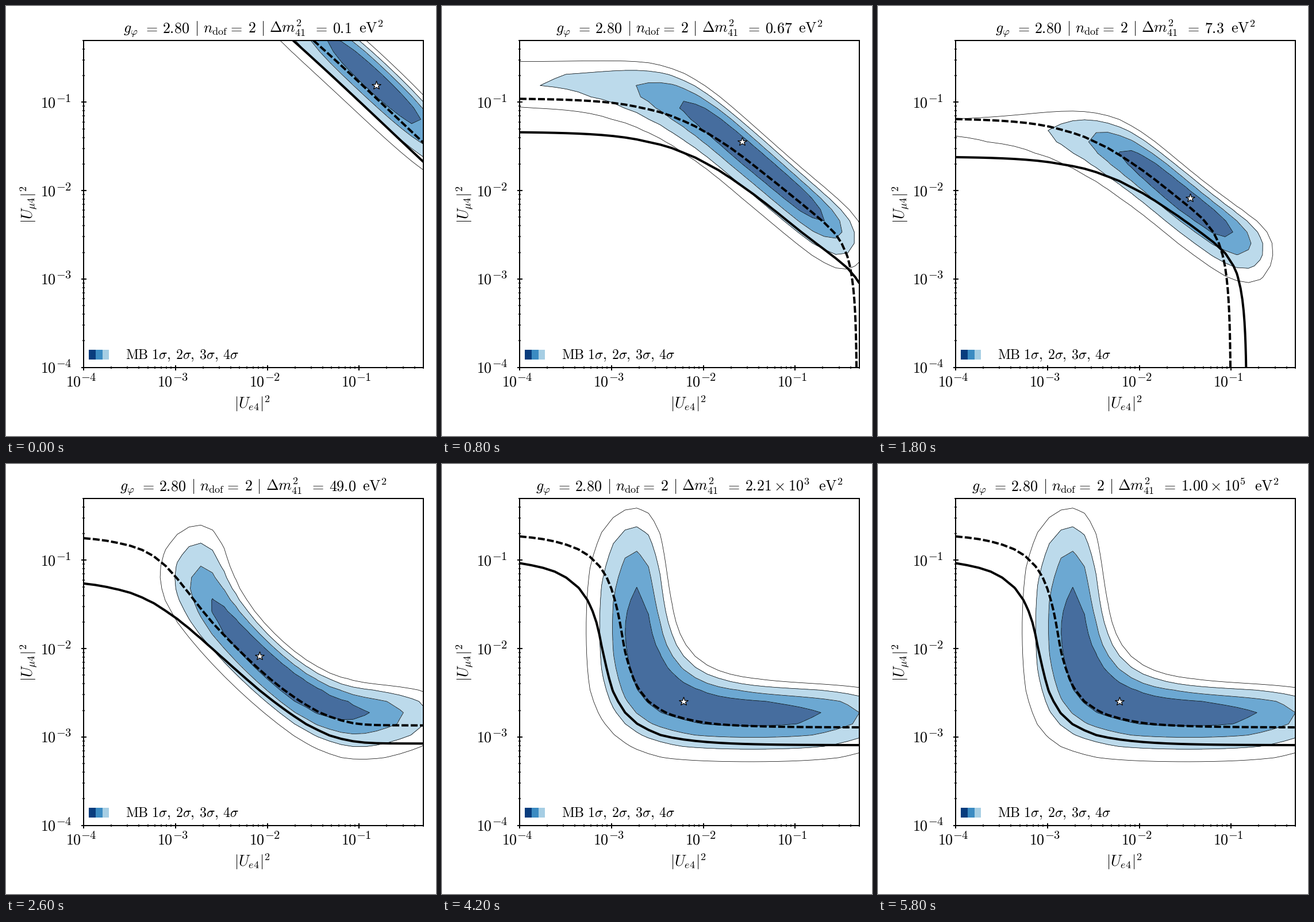
Animation, 748 px wide and 748 px high, one loop 6 s. Source, as a matplotlib script:

```python
import matplotlib.pyplot as plt
import numpy as np
from matplotlib.animation import FuncAnimation
from matplotlib.patches import Rectangle

SIZE, FRAMES, STEP = 748, 30, 200
LEFT, RIGHT, TOP, BOTTOM = 135, 726, 60, 628.5
W, H = RIGHT - LEFT, BOTTOM - TOP
PT = 0.72  # points per pixel at 100 dpi
LOW, HIGH, NODES = 1e-4, 0.5, 30

plt.rcParams["mathtext.fontset"] = "cm"
fig = plt.figure(figsize=(SIZE / 100, SIZE / 100), dpi=100, facecolor="white")
ax = fig.add_axes([LEFT / SIZE, 1 - BOTTOM / SIZE, W / SIZE, H / SIZE])
ax.set(xscale="log", yscale="log", xlim=(LOW, HIGH), ylim=(LOW, HIGH))
ax.set_autoscale_on(False)
ax.tick_params(which="major", direction="inout", length=9 * PT, width=2 * PT)
ax.tick_params(which="minor", direction="inout", length=5 * PT, width=1.6 * PT)
ax.tick_params(which="both", labelleft=False, labelbottom=False)
for spine in ax.spines.values():
    spine.set_linewidth(2 * PT)


# ---- model --------------------------------------------------------------

nodes = np.geomspace(LOW, HIGH, NODES)
ue, um = np.meshgrid(nodes, nodes)

BEST = 1.8e-3                       # preferred signal strength
SIGMAS = [2.30, 6.18, 11.83, 19.33]  # two degrees of freedom

# Each value glides between these frames on a log scale.
KEYS = [0, 4, 9, 13, 17, 21, 29]
PATHS = dict(
    decay=[0.066, 2.15, 7.7, 35, 190, 1300, 1e5],
    floor=[3e-3, 3e-3, 2.2e-3, 1e-5],          # signal left without U_e4
    power=[2, 2, 2, 1],
    um_scale=[0.316, 0.067, 0.018, 0.0125, 0.0172, 0.02],
    ue_scale=[0.29, 0.13, 0.064, 0.045, 0.0625, 0.08],
    ue_cap=[5, 0.7, 0.147, 5],
    solid=[0.38, 0.45, 0.65, 0.47, 0.45],
    solid_cap=[5, 0.046, 0.024, 0.06, 0.105],
    dashed=[0.63, 0.93, 0.94, 0.75, 0.71],
    dashed_cap=[5, 0.11, 0.066, 0.19, 0.2],
)
STAR_COL = [25, 19, 20, 15, 14, 14]
STAR_ROW = [25, 20, 15, 15, 12, 11]


def glide(name, k):
    path = PATHS[name]
    return np.exp(np.interp(k, KEYS[:len(path)], np.log(path)))


def strength(e, m, decay):
    """Share of the heavy state that decays, relative to the best value."""
    total = e + m
    return e * m / total * -np.expm1(-decay * total) / BEST


def chi2(k):
    r = strength(ue + glide("floor", k), um, glide("decay", k))
    p = glide("power", k)
    c = (18.5 * (r - 1) ** 2 / r**0.55
         + (um / glide("um_scale", k)) ** p + (ue / glide("ue_scale", k)) ** p)
    return c - c.min()


def exclusion(name, k):
    """Zero on the limit line, positive beyond it."""
    cap = 1.5 if name == "dashed" else 1
    q = (strength(ue, um, glide("decay", k)) / glide(name, k)
         + um / glide(name + "_cap", k) + (ue * cap / glide("ue_cap", k)) ** 4)
    return np.log(q)


# ---- artists ------------------------------------------------------------

blues = [plt.cm.Blues(v) for v in (0.95, 0.65, 0.35)]
fills = [tuple(1 - 0.75 * (1 - c) for c in b[:3]) for b in blues]
styles = {"solid": "-", "dashed": (0, (3, 1))}
drawn = []

star, = ax.plot([], [], "*", ms=16 * PT, mfc="white", mec="black", mew=1.2 * PT, zorder=2.2)

for i, color in enumerate(blues):
    ax.add_patch(Rectangle(((9 + 11.8 * i) / W, 14 / H), 11.8 / W, 16.5 / H, fc=color, lw=0,
                           transform=ax.transAxes, zorder=2))


def text(x, y, tex, size=26, ha="left", **kw):
    return fig.text(x / SIZE, 1 - y / SIZE, f"${tex}$", fontsize=size * PT, ha=ha,
                    va="baseline", **kw)


def power_of_ten(x, y, exponent):
    text(x, y, "10")
    text(x + 26.5, y - 9.5, str(exponent), 20.5)


decades = np.log10(HIGH / LOW)
for e in range(-4, 0):
    power_of_ten(LEFT + (e + 4) * W / decades - 31.5, 661, e)
    power_of_ten(60.5, BOTTOM - (e + 4) * H / decades + 9, e)

text(428.5, 700, r"|U_{e4}|^2", ha="center")
text(47.5, 345, r"|U_{\mu 4}|^2", ha="center", rotation=90, rotation_mode="anchor")
text(208, 614.5, r"\mathrm{MB}\ 1\sigma,\:2\sigma,\:3\sigma,\:4\sigma", 24)

HEAD, EM = 46.5, 26
title = [(x, text(x, HEAD, tex)) for x, tex in (
    (204.5, r"g_\varphi"), (239, "="), (272.5, "2.80"), (328, "|"), (343.3, r"n_{\mathrm{dof}}"),
    (386.5, "="), (421, "2"), (443, "|"), (458.3, r"\Delta m^2_{41}"), (534.5, "="),
    (568.2, "0.1"))]
value = title[-1][1]
unit = text(656, HEAD, r"\mathrm{eV}^2", ha="right")


def set_title(k):
    v = 10 ** (-1 + 6 * k / (FRAMES - 1))
    if v < 1000:
        tex = str(float(f"{v:.2g}"))
        extra = 0.5 * (len(tex) - 3)
    else:
        mantissa, e = f"{v:.2e}".split("e")
        tex = rf"{mantissa}\times 10^{int(e)}"
        extra = 3.17
    value.set_text(f"${tex}$")
    shift = extra * EM / 2
    for x, part in title:
        part.set_x((x - shift) / SIZE)
    unit.set_x((656 + shift) / SIZE)


def draw(k):
    while drawn:
        drawn.pop().remove()
    c = chi2(k)
    drawn.append(ax.contourf(ue, um, c, levels=[-1] + SIGMAS[:3], colors=fills, zorder=1))
    drawn.append(ax.contour(ue, um, c, levels=SIGMAS, colors="black", linewidths=0.75 * PT,
                            linestyles="-", zorder=1.1))
    for name, style in styles.items():
        drawn.append(ax.contour(ue, um, exclusion(name, k), levels=[0], colors="black",
                                linewidths=4 * PT, linestyles=[style], zorder=2))
    col, row = (round(np.interp(k, KEYS[:6], path)) for path in (STAR_COL, STAR_ROW))
    star.set_data([nodes[col]], [nodes[row]])
    set_title(k)
    return []


anim = FuncAnimation(fig, draw, frames=FRAMES, interval=STEP, repeat=True, repeat_delay=0,
                     blit=False)
plt.show()
```
